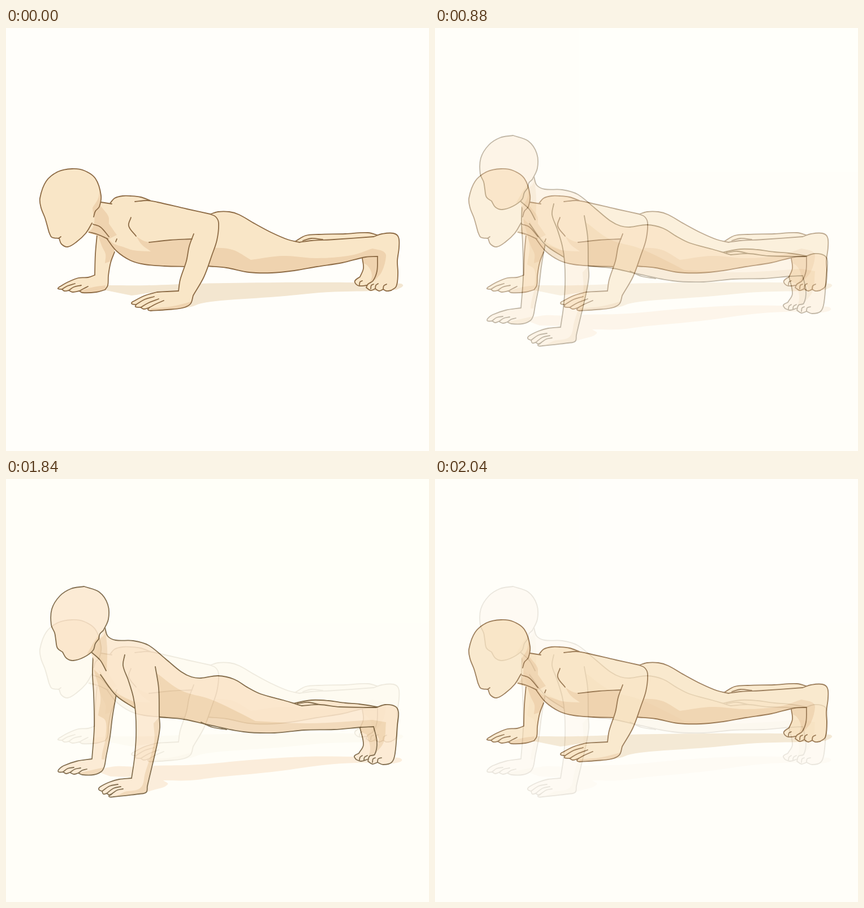
An HTML page for the animation above (2.08 s loop, 748x748 px).

```html
<!DOCTYPE html>
<html lang="en">
<head>
<meta charset="utf-8">
<title>Push-up</title>
<style>
html, body { margin: 0; width: 100%; height: 100%; overflow: hidden; background: #fffefa; }
svg { display: block; width: 100%; height: 100%; }
</style>
</head>
<body>
<svg id="stage" viewBox="0 0 748 748"></svg>
<script>
// Smooth curve through points; its tangents follow the neighbouring points
function spline(pts) {
  const tangent = i => {
    const a = pts[Math.max(i - 1, 0)], b = pts[Math.min(i + 1, pts.length - 1)];
    const len = Math.hypot(b[0] - a[0], b[1] - a[1]) || 1;
    return [(b[0] - a[0]) / len, (b[1] - a[1]) / len];
  };
  let d = '';
  for (let i = 1; i < pts.length; i++) {
    const [p, q, u, v] = [pts[i - 1], pts[i], tangent(i - 1), tangent(i)];
    const k = Math.hypot(q[0] - p[0], q[1] - p[1]) * 0.35;
    const c = [p[0] + u[0] * k, p[1] + u[1] * k, q[0] - v[0] * k, q[1] - v[1] * k];
    d += 'C' + [...c, ...q].map(n => n.toFixed(1)).join(' ');
  }
  return d;
}

// "x,y x,y" is one smooth run, "|" makes a corner, "~" lifts the pen
function curve(text) {
  return text.split('~').map(line => {
    let last = null, d = '';
    for (const run of line.split('|')) {
      const pts = run.trim().split(/\s+/).map(p => p.split(',').map(Number));
      if (last) pts.unshift(last);
      else d = 'M' + pts[0];
      d += spline(pts);
      last = pts[pts.length - 1];
    }
    return d;
  }).join('');
}

const join = (...runs) => runs.join('|');
const path = (d, fill, extra = '') => `<path d="${curve(d)}" fill="${fill}" ${extra}/>`;
let clips = 0;

function pose(id, look) {
  let out = `<rect width="748" height="748" fill="${look.bg}"/>`;
  const ink = `stroke="${look.ink}" stroke-width="1.8" stroke-linecap="round" stroke-linejoin="round"`;
  return {
    floor(d) { out += path(d, look.floor); },
    part(fill, shade, ...lines) {
      const clip = 'clip' + clips++;
      out += `<clipPath id="${clip}">${path(fill, '#000')}</clipPath>` + path(fill, look.skin) +
        `<g clip-path="url(#${clip})">${path(shade, look.dark)}</g>` +
        lines.map(d => path(d, 'none', ink)).join('');
    },
    get svg() { return `<g id="${id}">${out}</g>`; }
  };
}

function drawLow() {
  const p = pose('low', { bg: '#fffefa', skin: '#f9e6c7', dark: '#efd3af', ink: '#8d6b45', floor: '#f3e6d0' });
  p.floor('178,455 250,455 340,452 480,450 628,450 | 698,452 702,456 690,463 | 650,465 570,467 480,475 380,482 345,487 327,493 290,499 262,499 | 305,466 | 267,467 222,473 | 172,463');

  const farArm = '161,366 158,400 157,437 | 145,441 128,442 108,450 94,458 | 92,461 99,462 | 103,465 111,464 | 118,467 130,465 | 135,468 160,467 175,463 | 180,455 181,438 185,415 192,396';
  const farFingers = '99,462 109,456 122,452 ~ 111,464 120,458 133,455 ~ 130,465 137,461 145,457';
  p.part(join(farArm, '190,374'),
    '160,360 | 194,376 | 192,397 | 186,411 175,416 | 176,400 170,387 ~ 130,465 155,458 176,455 | 176,470 | 130,470',
    farArm, farFingers);

  const farLeg = '512,377 530,367 553,365 600,364 640,362 662,368';
  const farFoot = '638,455 625,456 619,453 617,447 626,440 | 632,425 630,407';
  p.part(join(farLeg, '655,440', farFoot, '560,400'),
    '622,404 | 664,404 | 660,456 | 640,456 | 647,438 639,420 622,412',
    farLeg, farFoot, '525,376 540,372 560,374 ~ 625,454 626,449 630,447');

  const nape = '168,308 187,311';
  const shoulder = '184,310 192,301 206,297 220,297 238,299 255,305';
  const hips = '359,330 375,325 395,325 412,330 440,346 470,362 498,374 519,379 | 540,376 580,374 650,369';
  const heel = '650,369 665,364 685,363 694,370 695,388 692,412 693,435 690,457 681,464';
  const toes = '681,464 673,465 667,462 | 660,465 653,461 | 645,464 637,459 | 640,453 649,447 656,430 657,404';
  const belly = '657,404 636,405 595,415 550,422 510,429 470,433 430,432 390,424 357,421';
  const chest = '322,422 280,421 245,418 220,411 195,394 178,372';
  const neckShade = '160,306 | 170,318 181,333 182,346 | 196,366 | 182,373 | 140,365 | 154,352 157,328';
  const chestShade = '178,368 190,381 207,387 | 225,393 256,395 | 240,383 230,368 | 245,377 262,378 | 332,374 | 322,424 | 230,424 | 185,392';
  const legShade = '360,388 400,392 433,410 | 490,403 550,407 610,402 648,390 | 667,395 672,403 665,430 652,447 | 656,404 | 650,436 | 450,440 | 350,426';
  p.part(join(nape, shoulder, hips, heel, toes, belly, chest, '145,362', '150,306'),
    [neckShade, chestShade, legShade].join('~'),
    nape, shoulder, hips, heel, toes, belly, chest,
    '147,361 162,365 180,373 ~ 154,347 167,352 182,369 ~ 196,373 194,378',
    '653,461 654,455 658,452 ~ 667,462 668,456 673,453 ~ 645,461 646,455 650,453');

  const arm = '228,307 250,305 268,308 320,320 361,329 | 371,334 376,345 373,375 364,402 350,440 331,473 | 326,488 312,495 285,498 256,500';
  const hand = '256,500 251,498 254,494 | 244,497 238,494 | 229,493 230,489 | 222,487 228,482 246,473 267,467 | 285,466 305,465';
  const inner = '305,465 308,445 319,412 324,386 332,364';
  const pit = '329,373 290,375 253,379';
  p.part(join(arm, hand, inner, pit, '230,368 218,352 221,335'),
    '256,496 295,492 327,484 | 323,502 | 254,502',
    arm, hand, inner, pit, '221,335 217,350 230,368',
    '230,489 245,480 262,475 ~ 238,494 252,486 270,479 ~ 254,494 265,488 279,482');

  const head = '155,334 158,324 165,316 168,296 158,266 138,252 117,249 92,254 71,271 60,301 62,318 69,336 76,361 | 81,370 94,372 | 98,382 109,387 125,378 141,363 152,345';
  p.part(head, '164,273 164,298 153,318 | 154,340 141,362 | 158,352 | 174,320 | 174,278', head, '93,372 97,369');
  return p.svg;
}

function drawHigh() {
  const p = pose('high', { bg: '#fffff8', skin: '#fce8cf', dark: '#f0d5b1', ink: '#715a38', floor: '#fbebd7' });
  p.floor('170,512 195,508 226,509 | 222,527 | 185,526 | 166,519 ~ 262,507 340,505 430,497 530,491 625,491 | 695,493 700,498 686,503 | 620,502 560,506 470,518 375,527 | 325,533 278,533 | 286,540 264,549 225,559 188,562 | 225,527');

  const farArm = '154,311 153,345 155,380 156,440 152,495 | 125,499 102,507 93,514 93,518 101,518 | 106,521 113,519 | 120,522 128,520 | 135,523 155,523 169,517 174,508 177,491 184,455 188,422 195,381';
  p.part(join(farArm, '175,330'),
    '155,336 | 200,380 | 190,424 | 174,496 | 169,495 176,460 | 176,428 163,418 | 167,385 155,336 ~ 128,520 | 173,510 | 173,526 | 128,526',
    farArm, '101,518 109,512 120,510 ~ 113,519 122,513 132,511 ~ 128,520 135,515 143,513');

  const farLeg = '507,397 540,391 570,392 600,396 625,398 663,404';
  const farFoot = '641,495 628,499 619,496 | 616,490 624,485 | 632,470 626,440';
  p.part(join(farLeg, '663,480', farFoot, '560,430'),
    '622,436 | 662,436 | 662,485 | 640,496 | 644,475 638,452 | 622,444',
    farLeg, farFoot, '515,397 535,395 555,399 ~ 625,497 626,492 630,489 ~ 633,497 634,492 639,489');

  const back = '175,263 180,278 194,285 225,286 252,294 282,318 310,341 328,350 345,352 375,348 403,354 428,369 450,380 490,391 523,401';
  const heel = '523,401 555,399 590,403 655,404 | 671,399 688,402 694,412 692,435 688,485 682,501 667,505 657,501';
  const toes = '657,501 648,504 640,499 | 643,490 652,487 656,465 650,438';
  const belly = '650,438 628,439 580,443 527,444 475,449 420,447 355,434 315,425 271,421';
  const chest = '229,406 195,383 167,346';
  const neckShade = '163,284 173,276 175,262 | 179,300 178,340 | 166,320 150,306';
  const chestShade = '164,338 192,375 230,396 | 230,416 | 186,382';
  const legShade = '266,343 310,374 360,389 400,407 441,428 | 535,432 648,426 | 672,430 | 668,465 652,487 | 660,460 | 650,442 | 420,455 | 262,424';
  p.part(join(back, heel, toes, belly, chest, '150,308'),
    [neckShade, chestShade, legShade].join('~'),
    back, heel, toes, belly, chest,
    '345,430 365,439 390,443 ~ 152,307 167,321 177,339',
    '648,501 649,495 653,493 ~ 657,501 658,495 664,493');

  const outer = '210,311 207,330 216,355 225,385 229,412 230,455 227,495 222,529';
  const hand = '222,529 200,531 183,536 167,544 164,549 170,552 | 172,557 178,556 | 184,559 188,556 | 182,561 190,562 235,557';
  const inner = '235,557 248,554 250,543 267,470 272,440 271,420 270,370 264,332';
  p.part(join(outer, hand, inner, '245,305'),
    '271,421 | 261,432 | 262,465 246,520 | 238,546 210,553 | 190,563 | 245,563 | 275,450',
    outer, hand, inner,
    '170,552 183,543 198,540 ~ 178,556 190,547 203,544 ~ 188,556 197,550 207,548');

  const head = '138,190 165,200 180,222 181,248 172,268 | 166,274 164,283 | 158,291 154,303 138,315 119,321 107,317 100,306 | 91,299 88,284 | 86,272 80,258 81,230 95,207 115,194 138,190';
  p.part(head, '172,266 157,286 143,310 | 160,303 | 176,268', head);
  return p.svg;
}

document.getElementById('stage').innerHTML = drawLow() + drawHigh();
const upper = document.getElementById('high');
const HOLD = 800, STEP = 40, STEPS = 7, HALF = 1040;

// Hold one pose, then dissolve to the other in even steps
function mix(ms) {
  const t = ms % (2 * HALF), local = t % HALF;
  const k = local < HOLD ? 0 : (Math.floor((local - HOLD) / STEP) + 1) / STEPS;
  return t < HALF ? k : 1 - k;
}

const start = performance.now();
function tick() {
  upper.setAttribute('opacity', mix(performance.now() - start));
  requestAnimationFrame(tick);
}
tick();
</script>
</body>
</html>
```
